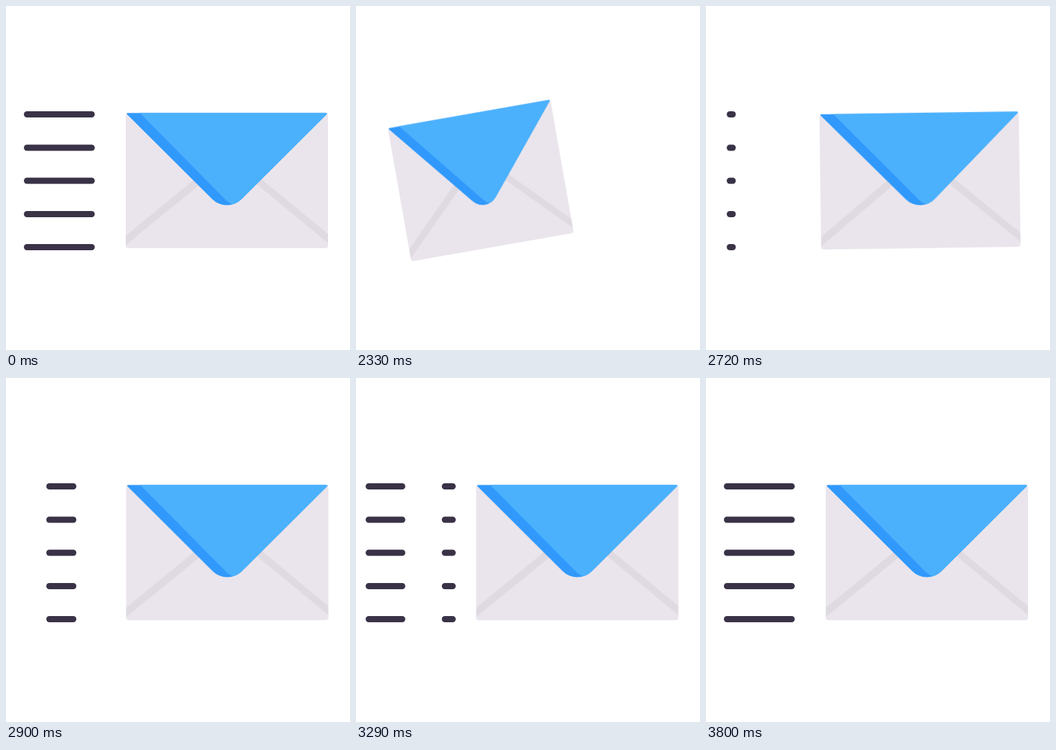
These frames come from a looping animation (500 px wide and 500 px high, 3.83 s). An HTML page:

```html
<!DOCTYPE html>
<html lang="en">
<head>
<meta charset="utf-8">
<title>Sending mail</title>
<style>
  html, body { margin: 0; width: 100%; height: 100%; overflow: hidden; background: #fff; }
  svg { display: block; width: 100%; height: 100%; }

  .envelope {
    transform-origin: 321px 254px;
    animation: swing 3830ms linear infinite;
  }
  .streaks {
    fill: none;
    stroke: #3a3347;
    stroke-width: 9;
    stroke-linecap: round;
    animation: streak 3830ms linear infinite;
  }

  /* rest, pull back, spring forward, settle */
  @keyframes swing {
    0%, 52.99% { transform: translateX(0) rotate(0deg) scaleX(1); }
    53% {
      transform: translateX(-57.7px) rotate(-3.85deg) scaleX(.922);
      animation-timing-function: cubic-bezier(.2, .6, .4, 1);
    }
    60.05% { transform: translateX(-139.5px) rotate(-10deg) scaleX(.816); }
    64.44% {
      transform: translateX(-139.5px) rotate(-10deg) scaleX(.816);
      animation-timing-function: cubic-bezier(.37, 0, .63, 1);
    }
    72.48%, 99.21% { transform: translateX(.6px) rotate(0deg) scaleX(1); }
    99.22%, 100% { transform: translateX(0) rotate(0deg) scaleX(1); }
  }

  /* each dash pattern sums to the line length, so a dash wraps around */
  @keyframes streak {
    0%, 52.99% { stroke-dasharray: 94px 28px; stroke-dashoffset: -12px; opacity: 1; }
    53% {
      stroke-dasharray: 51px 71px; stroke-dashoffset: -12px; opacity: 1;
      animation-timing-function: cubic-bezier(.2, .6, .4, 1);
    }
    60.05% { stroke-dasharray: 0px 122px; stroke-dashoffset: -12px; opacity: 1; }
    60.06%, 70.38% { stroke-dasharray: 0px 122px; stroke-dashoffset: -12px; opacity: 0; }
    70.39% { stroke-dasharray: 0px 122px; stroke-dashoffset: -12px; opacity: 1; }
    71.02% { stroke-dasharray: 4px 118px; stroke-dashoffset: -16px; opacity: 1; }
    79.63% { stroke-dasharray: 60px 62px; stroke-dashoffset: -68px; opacity: 1; }
    92.17% { stroke-dasharray: 60px 62px; stroke-dashoffset: -153px; opacity: 1; }
    99.21% { stroke-dasharray: 60px 62px; stroke-dashoffset: -200px; opacity: 1; }
    99.22%, 100% { stroke-dasharray: 94px 28px; stroke-dashoffset: -12px; opacity: 1; }
  }
</style>
</head>
<body>
<svg viewBox="0 0 500 500">
  <g class="streaks">
    <path d="M18.5 157.5h122"/>
    <path d="M18.5 206h122"/>
    <path d="M18.5 254h122"/>
    <path d="M18.5 302.5h122"/>
    <path d="M18.5 350.5h122"/>
  </g>
  <g class="envelope">
    <rect x="174" y="156" width="294" height="196" rx="4" fill="#eae5ec"/>
    <path d="M174 334L291 238V252L174 347.5ZM468 331.5L351 235V248L468 344.5Z" fill="#dfdae2"/>
    <path d="M177 155.5H465Q467.5 155.5 466 157.5L342 281A30 30 0 0 1 300 281L176 157.5Q174.500 155.5 177 155.5Z" fill="#3099fb"/>
    <path d="M194.500 155.5H465Q467.500 155.5 466 157.5L342 281A30 30 0 0 1 329.500 288.300Q323 286 317 279.500Z" fill="#4bb1fd"/>
  </g>
</svg>
</body>
</html>
```
